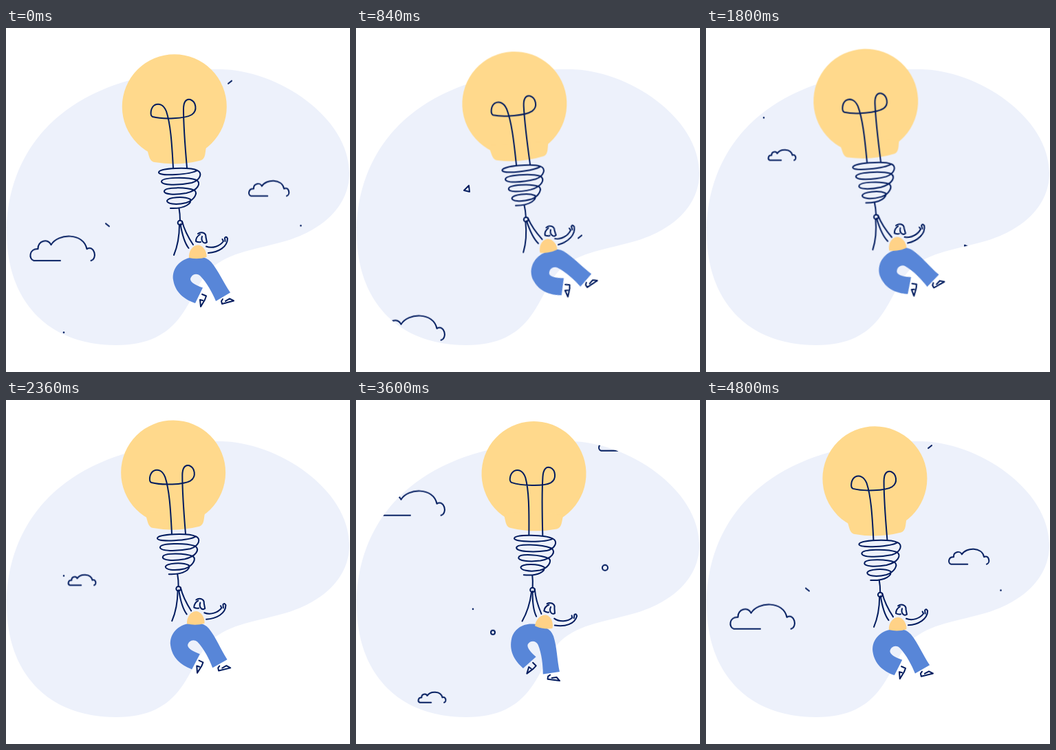
Recreate the animation shown at these times as an HTML page. Size 500 by 500 pixels, loop 4.84 s.

```html
<!DOCTYPE html>
<html lang="en">
<head>
<meta charset="utf-8">
<title>Flying on an idea</title>
<style>
  @property --p { syntax: "<number>"; inherits: true; initial-value: 0; }
  @property --x { syntax: "<number>"; inherits: true; initial-value: 0; }
  @property --lift { syntax: "<number>"; inherits: true; initial-value: 0; }

  html, body { margin: 0; width: 100%; height: 100%; overflow: hidden; background: #fff; }
  svg { display: block; width: 100vw; height: 100vh; }

  .line { fill: none; stroke: #001b5e; stroke-width: 2; stroke-linecap: round; stroke-linejoin: round; }
  .line path { vector-effect: non-scaling-stroke; }
  .dot { fill: #001b5e; stroke: none; }

  /* --p: swing angle, --x and --lift: position of the knot */
  .flyer {
    animation: swing 4840ms infinite, drift 4840ms infinite, lift 4840ms infinite;
    transform: translate(calc(var(--x) * 1px), calc(var(--lift) * 1px));
  }
  .bulb, .tail, .person { transform-origin: 253px 283px; }
  .bulb   { transform: rotate(calc(var(--p) * .155deg)); }
  .tail   { transform: rotate(calc(var(--p) * .33deg)); }
  .person { transform: rotate(calc(var(--p) * .46deg)); }
  .legs   { transform: rotate(calc(var(--p) * .54deg)); transform-origin: 279px 328px; }
  .arm    { transform: rotate(calc(var(--p) * .17deg)); transform-origin: 279px 328px; }
  .head   { transform: rotate(calc(var(--p) * -.14deg)); transform-origin: 279px 328px; }

  @keyframes swing {
    0%     { --p: 0;     animation-timing-function: cubic-bezier(.333, .325, .667, .672); }
    9.917% { --p: -10.5; animation-timing-function: cubic-bezier(.333, .416, .667, 1); }
    25.62% { --p: -23.6; animation-timing-function: cubic-bezier(.333, 0, .667, .576); }
    48.76% { --p: 1.5;   animation-timing-function: cubic-bezier(.333, .329, .667, .804); }
    61.98% { --p: 20;    animation-timing-function: cubic-bezier(.333, .83, .667, 1); }
    71.07% { --p: 23;    animation-timing-function: cubic-bezier(.333, 0, .667, .476); }
    85.12% { --p: 15;    animation-timing-function: cubic-bezier(.333, .296, .667, .659); }
    100%   { --p: 0; }
  }
  @keyframes drift {
    0%     { --x: 0;   animation-timing-function: cubic-bezier(.333, .55, .667, 1); }
    26.86% { --x: -7;  animation-timing-function: cubic-bezier(.333, 0, .667, 1); }
    74.38% { --x: 3.5; animation-timing-function: cubic-bezier(.333, 0, .667, .3); }
    100%   { --x: 0; }
  }
  @keyframes lift {
    0%   { --lift: 0;    animation-timing-function: cubic-bezier(.36, 0, .2, 1); }
    50%  { --lift: -8.8; animation-timing-function: cubic-bezier(.8, 0, .64, 1); }
    100% { --lift: 0; }
  }

  /* --y: height at time zero, --v: speed in px per ms */
  .fall {
    --v: .2675;
    animation: fall 4840ms linear infinite backwards;
    animation-delay: calc((var(--y) + 100) / var(--v) * -1ms);
  }
  .cloud { --v: .1375; }
  @keyframes fall {
    from { transform: translateY(-100px); }
    to   { transform: translateY(calc(var(--v) * 4840px - 100px)); }
  }
  .blink { animation: blink 4840ms step-end infinite; }
  @keyframes blink { 0% { opacity: 1; } .826%, 100% { opacity: 0; } }
</style>
</head>
<body>
<svg viewBox="0 0 500 500">
  <defs>
    <path id="blob" d="M310 60C395 60 499 130 499 211C499 262 455 296 405 310C355 324 318 327 293 355C262 392 258 461 160 461C60 461 1 396 1 297C1 185 75 60 310 60Z"/>
    <clipPath id="sky"><use href="#blob"/></clipPath>
    <path id="cloud" vector-effect="non-scaling-stroke" d="M44.5 0H6C-2-2-1-18 12-17C11-29 27-33 31-23C41-40 78-41 83-17C94-23 99-3 89 0"/>
  </defs>

  <use href="#blob" fill="#edf1fb"/>

  <g class="line" clip-path="url(#sky)">
    <g class="fall cloud" style="--y:338"><use href="#cloud" transform="translate(34.5 0)"/></g>
    <g class="fall cloud" style="--y:244"><use href="#cloud" transform="translate(352.5 0) scale(.622)"/></g>
    <g class="fall cloud" style="--y:-55.5"><use href="#cloud" transform="translate(90.3 0) scale(.425)"/></g>
    <path class="fall" style="--y:286" d="M145-2L150 2"/>
    <path class="fall" style="--y:78.5" d="M323 2L328-2"/>
    <path class="fall" style="--y:9" d="M157 2L164-5L165 4Z"/>
    <path class="fall" style="--y:-160" d="M376-6L387.5-1L378 7Z"/>
    <circle class="fall" style="--y:-719.5" cx="362" r="4"/>
    <circle class="fall" style="--y:-625.5" cx="199" r="3"/>
    <circle class="fall dot" style="--y:287" cx="428.5" r="1.3"/>
    <circle class="fall dot" style="--y:-659.5" cx="170" r="1.3"/>
    <circle class="fall dot" style="--y:-272;--v:.2234" cx="84" r="1.3"/>
    <circle class="blink dot" cx="84" cy="442.5" r="1.3"/>
  </g>

  <g class="flyer">
    <g class="bulb">
      <g fill="#ffd98c">
        <circle cx="244.8" cy="114.3" r="76"/>
        <path d="M203 172C208 181 207 194 216 195Q250 201 283 192.500C291 190 289 180 291.500 171Z"/>
      </g>
      <g class="line">
        <path d="M243 203C241 165 239 139 233 121C229 111 222 109 216 112C210 116 209 127 213 129C228 133 260 132 270 126C279 120 276 107 268 104C261 102 258 109 258 118C258 145 261 180 263 203"/>
        <path d="M278 207C268 202 222 203 222 210C223 216 268 213 278 207C286 210 283 221 270 225C250 229 226 229 226 223C227 217 262 216 277 221C284 226 279 236 262 240C245 243 229 242 230 237C231 231 262 231 274 236C279 240 274 250 262 254C245 258 234 255 234 251C236 246 258 244 268 249C270 254 262 263 239 262"/>
        <path d="M251.500 262C253 270 253 275 253 280"/>
      </g>
    </g>

    <path class="line tail" d="M252 286C252 300 249 318 244 330"/>
    <circle class="line" cx="253" cy="283" r="3.300"/>

    <g class="person">
      <g class="line">
        <path d="M256 281C259 293 266 306 272 315"/>
        <path d="M253.500 285C256 300 260 313 265.500 320"/>
      </g>
      <g class="legs">
        <path fill="#5886d8" d="M267 334C250 338 241 352 243 366C246 384 258 394 275 400L286 377.500C276 374 268 370 268 365C269 359 276 355 282 360C292 370 300 385 305 397L326 384.500C316 370 309 353 298 340Q291 333 283 333Z"/>
        <g class="line">
          <path d="M285 387L291 389.500L289 395L283 405L282 395L286 396"/>
          <path d="M315 394L313 397L314 401L331 396.500L325 393.500L319 397"/>
        </g>
      </g>
      <path fill="#ffd287" d="M266 334C265 325 271 316 279 315.500C287 316 292 325 291.500 333Q279 337 266 334Z"/>
      <g class="line head">
        <path d="M279 299Q282 296.500 286 297.500Q291 299 290.500 304L292 311.500"/>
        <path d="M282 300C277 303 276 307 276 310Q280 312 283 311"/>
        <path d="M285 303C283 309 287 314 291 312"/>
      </g>
      <g class="line arm">
        <path d="M291 317.500C300 321 311 317 316 310L314.500 307"/>
        <path d="M294 327C309 326 322 318 322 306Q320 302 318 305L318.500 310"/>
      </g>
    </g>
  </g>
</svg>
</body>
</html>
```
